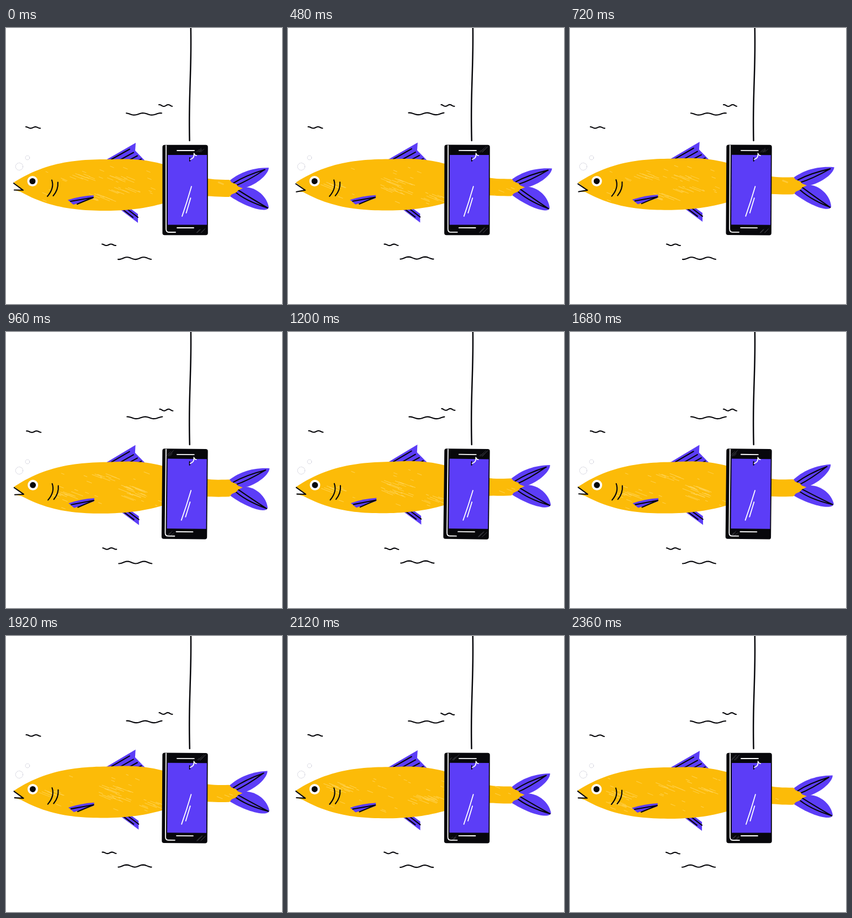
These frames come from a looping animation (500 px wide and 500 px high, 2.4 s). An HTML page:

```html
<!DOCTYPE html>
<html lang="en">
<head>
<meta charset="utf-8">
<title>Hooked fish</title>
<style>
html, body { margin: 0; width: 100%; height: 100%; overflow: hidden; background: #fff; }
svg { display: block; width: 100vw; height: 100vh; }
.ink, .chalk { fill: none; stroke: #07070b; stroke-width: 2.1; stroke-linecap: round; stroke-linejoin: round; }
.chalk { stroke: #fff; stroke-width: 1.8; }
.fin { fill: #5c3df7; }
.bubble { fill: none; stroke: #c9c9d6; stroke-dasharray: 2 1; }
</style>
</head>
<body>
<svg viewBox="0 0 500 500">
  <defs><clipPath id="skin"><path id="skinShape"/></clipPath></defs>
  <path id="ripples" class="ink"/>
  <g class="bubble">
    <circle cx="24" cy="251" r="6.6"/>
    <circle cx="39" cy="235" r="3.8"/>
  </g>
  <g id="fish">
    <g id="tail">
      <path class="fin" d="M402 279C420 264 442 253 476 253C476 266 450 287 427 291Z"/>
      <path class="fin" d="M424 289C450 284 473 304 476 325C473 336 436 326 403 303Z"/>
      <path class="ink" d="M412 281Q434 267 469 256.500M415 286Q438 277 468 257M415 290Q438 305 474 326M413 295Q433 313 474 326"/>
    </g>
    <path class="fin" d="M181 239L235 208L234 222L257 246Z"/>
    <path class="fin" d="M206 328L224 326L239 337V353Z"/>
    <path id="rays" class="ink"/>
    <path id="body" fill="#fcbb08"/>
    <path id="hatch" clip-path="url(#skin)" fill="none" stroke="#ffd14e" stroke-linecap="round"/>
    <path class="fin" d="M112 311.500Q135 304 159 303L158 309L122 320Z"/>
    <path class="ink" d="M117 314L158 307L129 319"/>
    <path class="ink" d="M83 275.500Q88 290 75 305M94 279.500Q95 293 85.500 304"/>
    <circle cx="48" cy="277.500" r="9.500" fill="#fff"/>
    <circle cx="48" cy="277.500" r="5.500" fill="#07070b"/>
    <path id="mouth" class="ink"/>
  </g>
  <path id="thread" class="ink" style="stroke-width:2.5"/>
  <g id="phone">
    <rect x="283.400" y="211.700" width="82.400" height="163.600" rx="4" fill="#07070b"/>
    <path id="scuffs" fill="none" stroke="#44444a" stroke-width=".7"/>
    <rect x="293" y="230" width="71" height="126.500" class="fin"/>
    <path class="chalk" d="M310 222H341M310 362H340M290 213V364Q290 370 295 370H307"/>
    <path class="chalk" d="M336 287Q328 315 319 341M334.500 308L326.500 335"/>
    <path class="ink" d="M333 235V241"/>
    <path class="chalk" d="M340.500 227Q342 231 345 231M340.500 229Q341 236 334 238"/>
  </g>
</svg>
<script>
const LOOP = 2400, STEP = 40, BEAT = 120;
const { PI, sin, cos, abs, min, max } = Math;
const $ = id => document.getElementById(id);
const set = (id, name, value) => $(id).setAttribute(name, value);
const clamp = u => min(1, max(0, u));
const smooth = u => (1 - cos(PI * clamp(u))) / 2;
const poly = pts => "M" + pts.map(p => p[0].toFixed(2) + " " + p[1].toFixed(2)).join("L");
const sample = (n, f) => Array.from({ length: n + 1 }, (_, i) => f(i / n, i));

// Rhythms of the swim, all at rest when t = 0.
const wave = (t, peak, n = 1) => cos(2 * PI * n * (t - peak) / LOOP);
const since0 = f => t => f(t) - f(0);
const sway = since0(t => wave(t, 150));
const bend = since0(t => wave(t, 100));
const pull = since0(t => wave(t, 250));
const flick = since0(t => .07 * wave(t, 550) + .02 * wave(t, 840, 2));

function random(seed) {
  let s = seed * 7919 + 17;
  return () => {
    s = s + 0x6D2B79F5 | 0;
    let r = Math.imul(s ^ s >>> 15, s | 1);
    r ^= r + Math.imul(r ^ r >>> 7, r | 61);
    return ((r ^ r >>> 14) >>> 0) / 4294967296;
  };
}

// A spindle: blunt toward the head, easing into an even tail stock.
const half = x => x < 190
  ? 46.5 * (1 - ((190 - x) / 183) ** 2.7)
  : 15.5 + 31 * cos(PI / 2 * clamp((x - 190) / 185) ** 1.35) ** 2;
const spine = x => 284.5 + 6 * smooth((x - 284) / 120) - 2.2 * sin(PI * clamp((x - 190) / 190));
const edge = side => sample(60, u => {
  const x = 14 + 390 * u;
  return [x, spine(x) + side * half(x)];
});
const back = edge(-1);
const belly = edge(1).reverse().filter(p => p[0] > 26);
const frayed = sample(8, (u, i) => [406 + 23 * (1 - abs(2 * u - 1)) - i % 2 * 3, 276 + 29 * u]);

const ripples = [
  { x: 218, y: 155.6, len: 64, amp: 1.8, turns: 2 },
  { x: 277, y: 140.8, len: 24, amp: 1.5, turns: 1.5 },
  { x: 36, y: 180.2, len: 26, amp: 1.3, turns: 1.5 },
  { x: 174, y: 392.8, len: 25, amp: 1.3, turns: 1.5 },
  { x: 203, y: 417, len: 60, amp: -2, turns: 2 }
];

function rippling(drift, rnd) {
  return ripples.map(r => {
    const dy = rnd() - .5, phase = (rnd() - .5) * .8;
    return poly(sample(24, u =>
      [r.x + drift + r.len * u, r.y + dy - r.amp * cos(2 * PI * r.turns * u + phase)]));
  }).join("");
}

function threading(rnd) {
  const phase = (rnd() - .5) * .3;
  return poly(sample(30, u => [333.6 + 1.4 * cos(4.4 * u - .43 + phase), 204 * u]));
}

function hatching(rnd) {
  let d = "";
  const dash = (x, y, len) => d += `M${x} ${y}l${len} ${len * .4}`;
  for (let k = 0; k < 4; k++) {
    const x = 55 + rnd() * 190, y = 258 + rnd() * 45;
    for (let i = 0; i < 8; i++) dash(x + i * 5, y + rnd() * 9, 8 + rnd() * 14);
  }
  for (let i = 0; i < 30; i++) dash(60 + rnd() * 350, 248 + rnd() * 75, 3 + rnd() * 7);
  return d;
}

function scuffing(rnd) {
  let d = "";
  const x = rnd() < .5 ? 290 : 344;
  for (const y of [225, 371]) {
    for (let i = 0; i < 6; i++) {
      const len = 4 + rnd() * 7;
      d += `M${x + rnd() * 10} ${y}l${len} ${-len}`;
    }
  }
  return d;
}

function raysPath() {
  let d = "";
  for (let i = 0; i < 4; i++) d += poly([[191 + 15.5 * i, 238 + i], [224 + 7 * i, 219.5 + 6 * i]]);
  for (let i = 0; i < 2; i++) d += poly([[212 + 9 * i, 329], [230 + 9 * i, 343]]);
  return d;
}
set("rays", "d", raysPath());

function draw(t) {
  const rnd = random(Math.floor(t / BEAT) % 6);
  set("hatch", "d", hatching(rnd));
  set("scuffs", "d", scuffing(rnd));
  set("ripples", "d", rippling(.7 * (1 - wave(t, 0)), rnd));
  set("thread", "d", threading(rnd));

  const s = sway(t), dx = pull(t), dy = 1.6 * bend(t), turn = .64 * s;
  set("fish", "transform", `translate(${-.5 * s} 0) rotate(${turn} 40 278)`);

  // The bend grows from behind the phone to the tail.
  const flex = ([x, y]) => {
    const k = max(0, (x - 330) / 99);
    return [x + dx * k, y + dy * k];
  };
  const gape = 4 * ((1 + wave(t, 550)) / 2) ** 3;
  const lip = [14, 281 + gape * .3], jaw = [15, 292.8 + gape], hinge = [31, 293.8];
  const outline = poly([...[...back, ...frayed, ...belly].map(flex), jaw, hinge]) + "Z";
  set("body", "d", outline);
  set("skinShape", "d", outline);
  set("mouth", "d", poly([lip, hinge, jaw]));

  const angle = flick(t) * 180 / PI - turn;
  set("tail", "transform", `translate(${dx} ${dy}) rotate(${angle} 420 290)`);
  set("phone", "transform", `rotate(${-.38 * s} 333 205)`);
}

const start = performance.now();
function tick() {
  const t = (performance.now() - start) % LOOP;
  draw(Math.floor(t / STEP) * STEP);
  requestAnimationFrame(tick);
}
tick();
</script>
</body>
</html>
```
